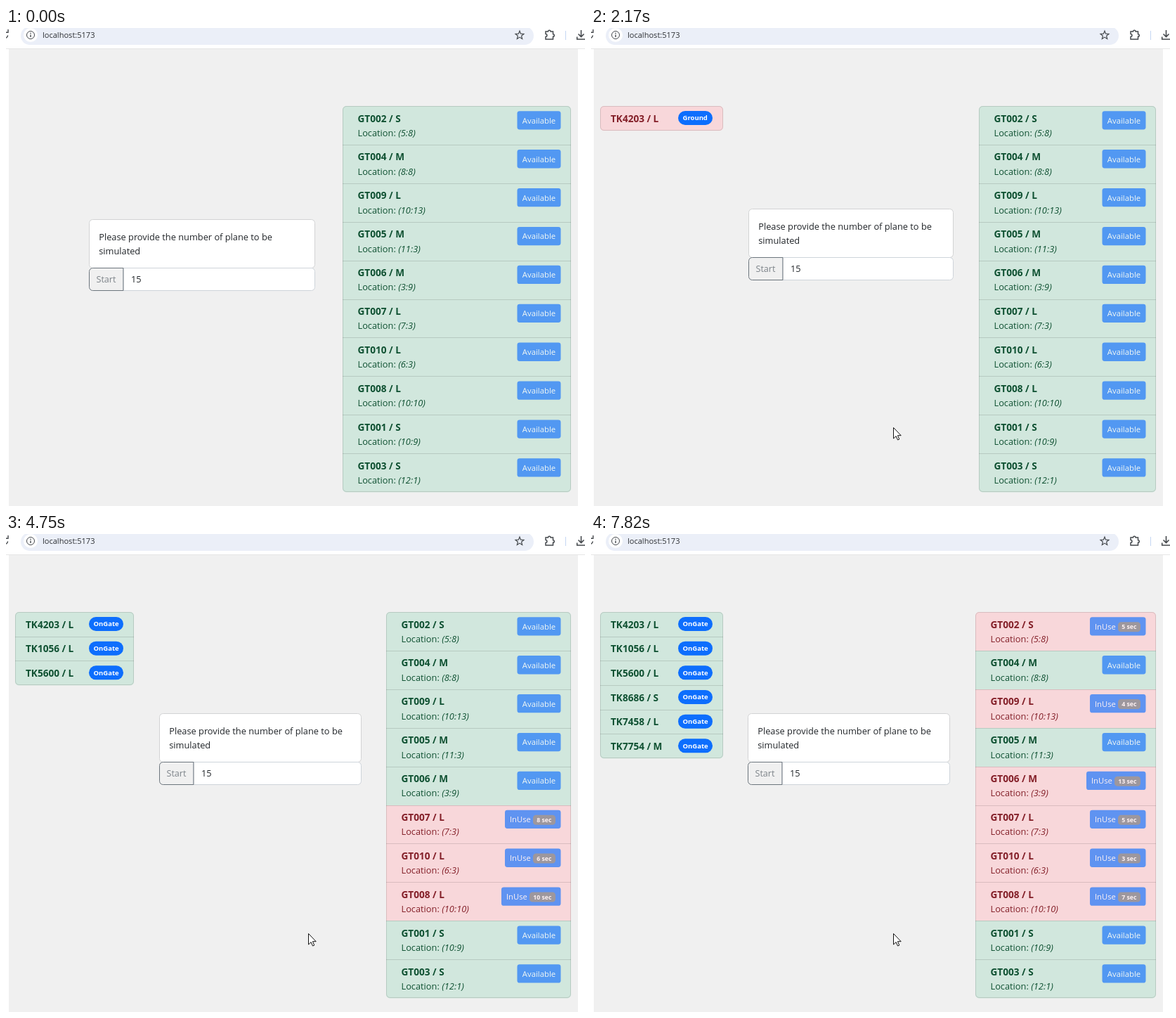
Animation, 824 px wide and 680 px high, one loop 8000 ms. Source, as an HTML page with a canvas:

```html
<!DOCTYPE html>
<html lang="en">
<head>
<meta charset="utf-8">
<title>Gate simulation</title>
<style>
  html, body { margin: 0; width: 100%; height: 100%; overflow: hidden; background: #fff; }
  canvas { display: block; }
</style>
</head>
<body>
<canvas id="stage" width="824" height="680"></canvas>
<script>
const ctx = document.getElementById('stage').getContext('2d');
const LOOP = 8000;
const FAMILY = '"Open Sans", "Noto Sans", sans-serif';

// Every tick lowers the running countdowns by one second.
const ticks = [2700, 3760, 4750, 5760, 6760, 7750];

const planes = [
  { name: 'TK4203 / L', lands: 2170, docks: 2700 },
  { name: 'TK1056 / L', lands: 2900, docks: 3760 },
  { name: 'TK5600 / L', lands: 3890, docks: 4750 },
  { name: 'TK8686 / S', lands: 4950, docks: 5760 },
  { name: 'TK7458 / L', lands: 5960, docks: 6760 },
  { name: 'TK7754 / M', lands: 6960, docks: 7750 }
];

const gates = [
  { name: 'GT002 / S', place: '(5:8)', from: 5760, seconds: 7 },
  { name: 'GT004 / M', place: '(8:8)' },
  { name: 'GT009 / L', place: '(10:13)', from: 6760, seconds: 5 },
  { name: 'GT005 / M', place: '(11:3)' },
  { name: 'GT006 / M', place: '(3:9)', from: 7750, seconds: 13 },
  { name: 'GT007 / L', place: '(7:3)', from: 3760, seconds: 9 },
  { name: 'GT010 / L', place: '(6:3)', from: 2700, seconds: 8 },
  { name: 'GT008 / L', place: '(10:10)', from: 4750, seconds: 10 },
  { name: 'GT001 / S', place: '(10:9)' },
  { name: 'GT003 / S', place: '(12:1)' }
];

// Column edges, which follow the content of the lists.
const layouts = [
  { at: 0, planesEnd: 0, formX: 118, formEnd: 439, formY: 272, gatesX: 479 },
  { at: 2170, planesEnd: 187, formX: 224, formEnd: 515, formY: 257, gatesX: 552 },
  { at: 2700, planesEnd: 186, formX: 223, formEnd: 514, formY: 257, gatesX: 551 },
  { at: 4750, planesEnd: 181, formX: 218, formEnd: 505, formY: 255, gatesX: 541 },
  { at: 5760, planesEnd: 183, formX: 219, formEnd: 507, formY: 255, gatesX: 544 },
  { at: 6960, planesEnd: 187, formX: 223, formEnd: 510, formY: 255, gatesX: 547 }
];

const pointerPath = [
  { at: 130, x: 705, y: 664 },
  { at: 690, x: 134, y: 332 },
  { at: 830, x: 130, y: 340 },
  { at: 1670, x: 130, y: 341 },
  { at: 1810, x: 433, y: 576 },
  { at: 2020, x: 430, y: 568 }
];

const free = { back: '#d1e7dd', ink: '#0f5132', button: '#5298f2' };
const busy = { back: '#f8d7da', ink: '#842029', button: '#5f93f1' };

const clamp = v => Math.max(0, Math.min(1, v));
const mix = (a, b, p) => a + (b - a) * p;

function text(str, x, y, size, color, style = '') {
  ctx.font = `${style} ${size}px ${FAMILY}`;
  ctx.fillStyle = color;
  ctx.fillText(str, x, y);
}

function box(x, y, w, h, radii, fill, stroke) {
  ctx.beginPath();
  ctx.roundRect(x, y, w, h, radii);
  if (fill) { ctx.fillStyle = fill; ctx.fill(); }
  if (stroke) { ctx.strokeStyle = stroke; ctx.lineWidth = 1; ctx.stroke(); }
}

function lines(path, color, width = 1.4) {
  ctx.strokeStyle = color;
  ctx.lineWidth = width;
  ctx.stroke(new Path2D(path));
}

function toolbar() {
  const ink = '#45494d';
  box(0, 29, 824, 1, 0, '#e6e6e6');
  box(21, -2, 730, 26, 13, '#ebeff8');
  box(25, 0, 20, 20, 10, '#fff');
  box(29.5, 4.5, 11, 11, 5.5, null, ink);
  lines('M35 9.5v3.6M35 6.7v1.5', ink);
  text('localhost:5173', 52, 14, 11.05, '#2c2f33');
  lines('M-2 6.2L3 6.2V2M-3 14.5A5 5 0 0 0 2.6 10.5', ink);

  let star = '';
  for (let i = 0; i < 10; i++) {
    const r = i % 2 ? 2.7 : 6.2, a = i * Math.PI / 5;
    star += `${i ? 'L' : 'M'}${731 + r * Math.sin(a)} ${10.4 - r * Math.cos(a)}`;
  }
  lines(star + 'Z', ink, 1.2);
  lines('M768 5h3.5a1.8 1.8 0 0 1 3.6 0h3.4v3.7a1.8 1.8 0 0 1 0 3.6v3.7h-10.5v-3.6a1.9 1.9 0 0 0 0-3.8Z', ink, 1.5);
  box(796, 4, 1, 13, 0, '#c5d6f3');
  lines('M818.5 3v9M814.5 8.5l4 4l4-4M812.7 12.5v3.5h12', ink, 1.6);
}

function list(x, end, rows, pitch, drawRow) {
  const y = 111, height = rows.length * pitch;
  if (!rows.length) return;
  ctx.save();
  ctx.beginPath();
  ctx.roundRect(x, y, end - x + 1, height + 0.5, 5);
  ctx.clip();
  rows.forEach((row, i) => {
    const top = Math.round(y + i * pitch);
    box(x, top, end - x + 1, pitch + 1, 0, row.look.back);
    if (i) box(x, top, end - x + 1, 1, 0, 'rgba(0,0,0,.125)');
    drawRow(row, y + i * pitch);
  });
  ctx.restore();
  box(x + 0.5, y + 0.5, end - x, Math.round(height) - 1, 5, null, 'rgba(0,0,0,.125)');
}

function planeList(t, end) {
  const rows = planes.filter(p => t >= p.lands).map(p => ({
    ...p, look: t >= p.docks ? free : busy, status: t >= p.docks ? 'OnGate' : 'Ground'
  }));
  list(13, end, rows, 34.67, (row, y) => {
    text(row.name, 28, y + 22.5, 13.6, row.look.ink, 'bold');
    box(end - 63, y + 7, 49, 20, 10, '#0d6efd');
    text(row.status, end - 56.5, y + 20.3, 9.5, '#fff', 'bold');
  });
}

function gateList(t, x) {
  const rows = gates.map(g => ({ ...g, look: t >= g.from ? busy : free }));
  list(x, 803, rows, 54.9, (row, y) => {
    const { look } = row;
    text(row.name, x + 21.5, y + 22.5, 13.6, look.ink, 'bold');
    text('Location: ', x + 21.5, y + 42.8, 12.8, look.ink);
    const placeX = x + 21.5 + ctx.measureText('Location: ').width;
    text(row.place, placeX, y + 42.8, 12.8, look.ink, 'italic');

    const right = 789.5, top = y + 7.2;
    if (look === free) {
      box(right - 62, top, 62, 26.3, 3.4, look.button);
      text('Available', right - 54.7, top + 17.5, 11.35, '#f0f7f4');
      return;
    }
    const left = row.seconds - ticks.filter(k => k > row.from && k <= t).length;
    const wide = left > 9 ? 5 : 0;
    box(right - 79.5 - wide, top, 79.5 + wide, 26.3, 3.4, look.button);
    text('InUse', right - 72.5 - wide, top + 17.5, 11.2, '#fdf1f2');
    box(right - 39.5 - wide, top + 7, 32 + wide, 14, 4.3, '#9d979d');
    text(`${left} sec`, right - 34.2 - wide, top + 17.1, 8.7, '#fdf1f2', 'bold');
  });
}

function form(t, { formX, formEnd, formY }) {
  const x = formX + 0.5, y = formY + 0.5, w = formEnd - formX;
  box(x, y, w, 69, 5, '#fff', '#d2d3d4');
  text('Please provide the number of plane to be', x + 13.7, y + 29, 12.8, '#212529');
  text('simulated', x + 13.7, y + 49.2, 12.8, '#212529');

  box(x + 48, y + 69, w - 48, 32, [0, 5, 5, 0], '#fff', '#ced4da');
  text('15', x + 59.5, y + 89.8, 12.8, '#212529');

  const out = clamp((t - 1760) / 150);
  const hover = clamp((t - 690) / 150) * (1 - out) ** 2;
  box(x, y + 69, 48.5, 32, [5, 0, 0, 5], `rgba(108,117,125,${hover})`, '#6c757d');
  const tone = [125, 131, 137].map(c => Math.round(mix(c, 255, hover)));
  text('Start', x + 10, y + 89.8, 12.6, `rgb(${tone})`);
}

function pointer(t) {
  if (t < 130) return;
  // The pointer is sampled every 70 ms.
  const now = t - (t - 130) % 70;
  const next = pointerPath.findIndex(k => k.at > now);
  let { x, y } = pointerPath[pointerPath.length - 1];
  if (next > 0) {
    const a = pointerPath[next - 1], b = pointerPath[next];
    const p = a.at === 830 ? (t >= 1140 ? 1 : 0) : (now - a.at) / (b.at - a.at);
    x = mix(a.x, b.x, p);
    y = mix(a.y, b.y, p);
  }
  const hand = now >= 760 && now < 1740;
  const shape = new Path2D(hand
    ? 'M-1.5 1.5a1.5 1.5 0 0 1 3 0v6l5 1q2 .5 2 2.5v4l-2 5.5h-7l-5.5-8q0-2 2-1.3l2.5 2Z'
    : 'M.5.5v15.5l3.6-3.4l2.4 5.4l2.3-1l-2.4-5.3h4.8Z');
  ctx.save();
  ctx.translate(Math.round(x), Math.round(y));
  ctx.fillStyle = '#fff';
  ctx.fill(shape);
  ctx.strokeStyle = '#111';
  ctx.lineWidth = 1;
  ctx.stroke(shape);
  ctx.restore();
}

function draw(t) {
  const layout = layouts.filter(l => l.at <= t).pop();
  box(0, 0, 824, 680, 0, '#fff');
  box(4, 30, 810, 650, 0, '#f0f0f0');
  toolbar();
  planeList(t, layout.planesEnd);
  form(t, layout);
  gateList(t, layout.gatesX);
  pointer(t);
}

const start = performance.now();
function frame() {
  draw((performance.now() - start) % LOOP);
  requestAnimationFrame(frame);
}
frame();
</script>
</body>
</html>
```
